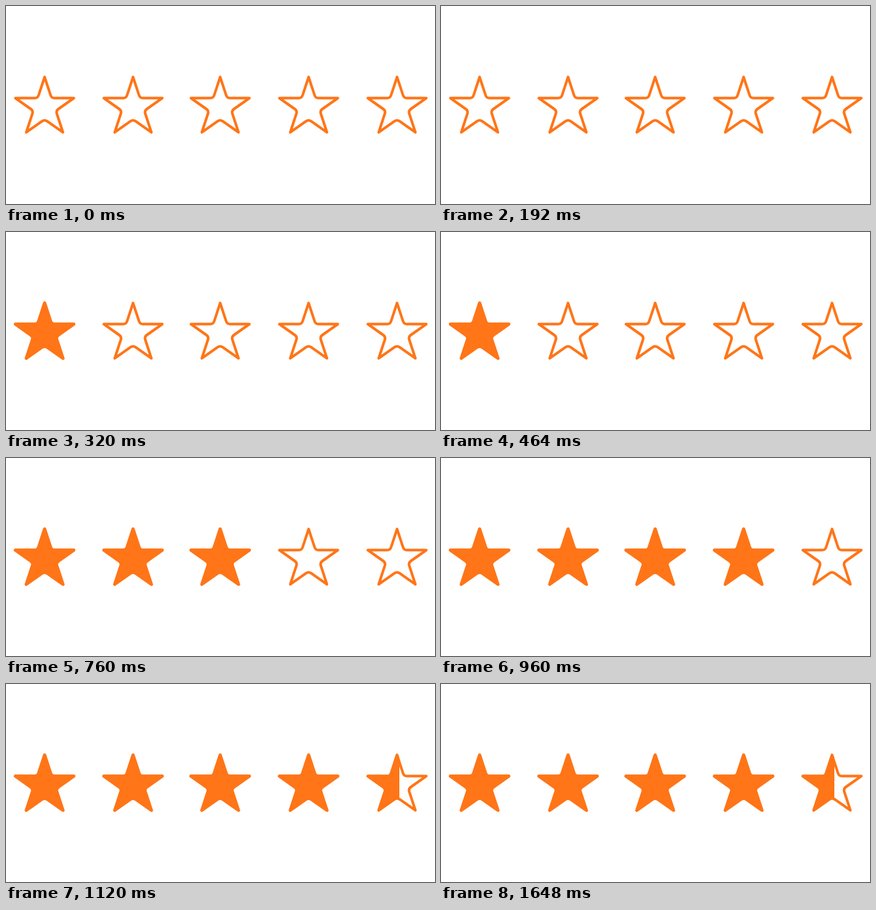
Write an HTML page that moves like this. It is 650 px wide and 300 px high and loops after 2000 ms.

```html
<!DOCTYPE html>
<html lang="en">
<head>
<meta charset="utf-8">
<title>Star rating</title>
<style>
html, body { margin: 0; width: 100%; height: 100%; overflow: hidden; background: #fff; }
svg { display: block; width: 100%; height: 100%; }
</style>
</head>
<body>
<svg viewBox="0 0 650 300" stroke="#ff7517" stroke-linejoin="round">
  <defs>
    <path id="star" d="M0 107.6 L9 135 Q10.5 139.6 15 139.6 H44.3 L21 156 Q17 158.8 18.5 163.2 L27.8 191.4 L4 174.6 Q0 171.8 -4 174.6 L-27.8 191.4 L-18.5 163.2 Q-17 158.8 -21 156 L-44.3 139.6 H-15 Q-10.5 139.6 -9 135 Z"/>
    <clipPath id="half"><rect x="-50" y="100" width="53.5" height="100"/></clipPath>
  </defs>
</svg>
<script>
const LOOP = 2000;
const centers = [58.5, 192.5, 324.5, 458.5, 592.5];
const fillTimes = [320, 560, 760, 960, 1120];
const svg = document.querySelector('svg');

function add(x, attrs) {
  const group = document.createElementNS(svg.namespaceURI, 'g');
  const star = document.createElementNS(svg.namespaceURI, 'use');
  group.setAttribute('transform', `translate(${x} 0)`);
  star.setAttribute('href', '#star');
  for (const key in attrs) star.setAttribute(key, attrs[key]);
  group.append(star);
  svg.append(group);
  return group;
}

const fills = centers.map((x, i) => {
  add(x, { fill: 'none', 'stroke-width': 4 });
  const isHalf = i === centers.length - 1;
  return add(x, isHalf
    ? { fill: '#ff7517', 'stroke-width': 4, 'clip-path': 'url(#half)' }
    : { fill: '#ff7517', 'stroke-width': 4.8 });
});

function draw(now) {
  const t = now % LOOP;
  fills.forEach((fill, i) => {
    fill.style.visibility = t >= fillTimes[i] ? 'visible' : 'hidden';
  });
  requestAnimationFrame(draw);
}
draw(0);
</script>
</body>
</html>
```
